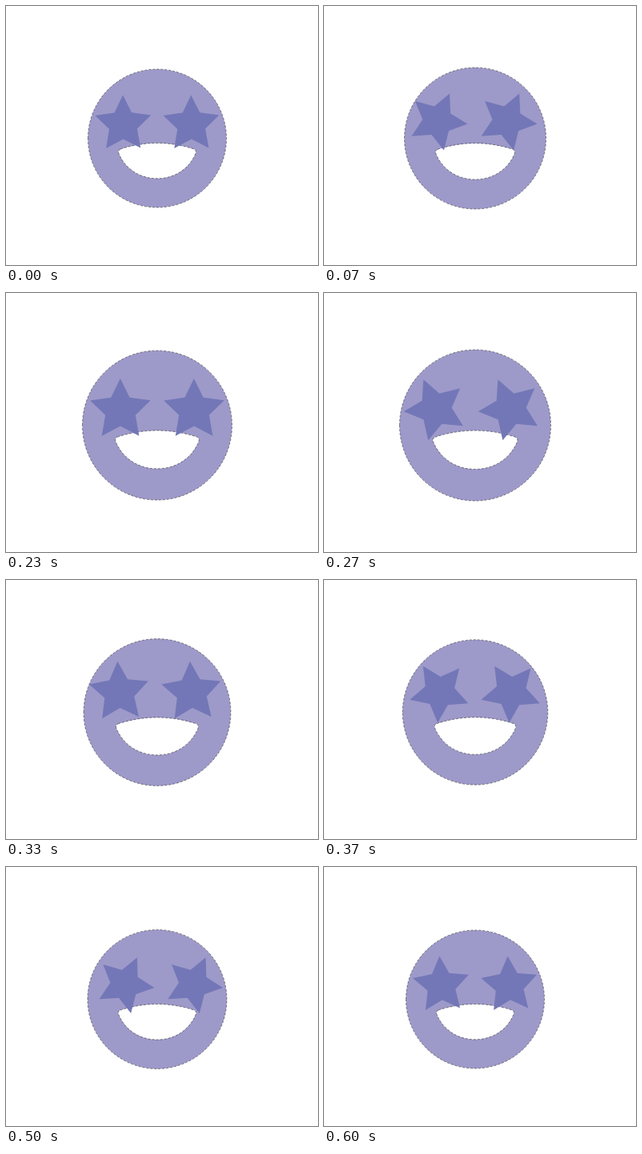
These frames come from a looping animation (390 by 324 pixels, 2010 ms). An HTML page:

```html
<!DOCTYPE html>
<html lang="en">
<head>
<meta charset="utf-8">
<title>Star-struck face</title>
<style>
  html, body { margin: 0; width: 100%; height: 100%; overflow: hidden; background: #fff; }
  svg { display: block; width: 390px; height: 324px; }
  #face { fill: #9d99c9; stroke: #333; stroke-width: .6; stroke-dasharray: 3 2; vector-effect: non-scaling-stroke; }
  .star { fill: #7377b7; }
</style>
</head>
<body>
<svg viewBox="0 0 390 324">
  <g id="head">
    <path id="face" fill-rule="evenodd" d="M-86.5 0A86.5 86.5 0 1 1 86.5 0A86.5 86.5 0 1 1 -86.5 0Z
      M-46 13.5Q0 -1.5 46 13.5Q49.5 15 48 19C40 38 22 50.3 0 50.3S-40 38 -48 19Q-49.5 15 -46 13.5Z"/>
    <polygon class="star"/>
    <polygon class="star"/>
  </g>
</svg>
<script>
const LOOP = 2010, LAST = 18, RADIUS = 86.5;
const head = document.getElementById('head');
const stars = [...document.querySelectorAll('.star')];

// Star drawn around the middle of its bounding box, so its centre orbits as it spins
const points = Array.from({ length: 10 }, (_, i) => {
  const r = i % 2 ? 18.3 : 36.7, a = (i * 36 - 90) * Math.PI / 180;
  return [r * Math.cos(a), 3.4 + r * Math.sin(a)].map(v => v.toFixed(2)).join();
}).join(' ');
stars.forEach(star => star.setAttribute('points', points));

// Two turns that slow down: [step, degrees, degrees per step]
const spin = [[0, -0.5, 46], [2, 95.7, 50.2], [5, 255.5, 52.3], [8, 409.5, 48],
  [10, 501, 43.5], [13, 618, 32], [18, 716.5, 7]];

function angleAt(n) {
  const i = Math.min(spin.findLastIndex(key => key[0] <= n), spin.length - 2);
  const [n0, a, va] = spin[i], [n1, b, vb] = spin[i + 1];
  const h = n1 - n0, u = (n - n0) / h, w = 1 - u;
  return w * w * ((1 + 2 * u) * a + u * h * va) + u * u * ((1 + 2 * w) * b - w * h * vb);
}

function radiusAt(n) {
  return RADIUS + (n < 8 ? n : 8 * Math.max(0, (16 - n) / 8) ** 1.35);
}

function draw(now) {
  const t = Math.floor(now % LOOP / 10) * 10;
  const n = Math.min(LAST, Math.floor((t + 4) * 0.03)); // 30 steps per second
  head.setAttribute('transform', `translate(189 165.5) scale(${radiusAt(n) / RADIUS})`);
  stars.forEach((star, i) =>
    star.setAttribute('transform', `translate(${i ? 42.6 : -42.6} -20.8) rotate(${angleAt(n)})`));
}

const start = performance.now();
function tick() {
  draw(performance.now() - start);
  requestAnimationFrame(tick);
}
tick();
</script>
</body>
</html>
```
